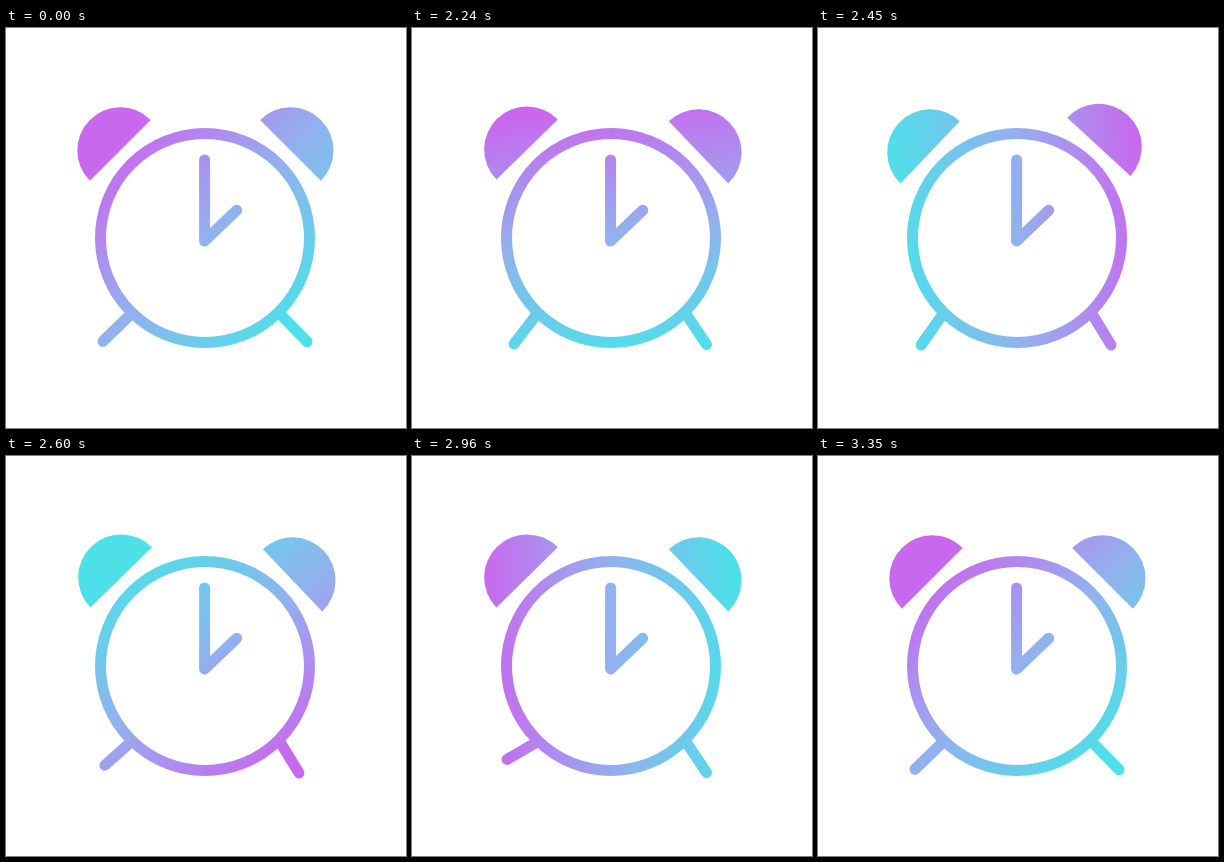
An HTML page with a canvas for the animation above (3440 ms loop, 400x400 px).

```html
<!DOCTYPE html>
<html lang="en">
<head>
<meta charset="utf-8">
<title>Alarm clock</title>
<style>
html, body { margin: 0; width: 100%; height: 100%; overflow: hidden; background: #fff; }
canvas { display: block; }
</style>
</head>
<body>
<canvas id="stage" width="400" height="400"></canvas>
<script>
const ctx = document.getElementById('stage').getContext('2d');
const LOOP = 3440, RING_START = 2030, STEP = 30, LAST_STEP = 44;
const CENTER = { x: 199, y: 210 };
const RAD = Math.PI / 180;

// step, gradient angle, left foot x/y, right foot x/y
const POSES = [
  [0, 46, 100.5, 312.5, 296, 313],
  [7, 82, 102, 316, 294.5, 316.5],
  [14, 176, 103.2, 317, 293, 317],
  [24, 292, 94.5, 301.5, 293, 317],
  [31, 357, 95, 303.5, 294.5, 316.5],
  [44, 405, 97, 313.3, 301, 313.7]
];
const REST = POSES[POSES.length - 1];

// The bells rattle in a cycle of three steps.
const LEFT_RATTLE = [-0.9, 0.55, -1.4];
const RIGHT_RATTLE = [1.6, 1.35, -2.35];

function poseAt(step) {
  const i = POSES.findIndex(p => p[0] >= step);
  if (i <= 0) return POSES[0];
  const a = POSES[i - 1], b = POSES[i];
  const k = (step - a[0]) / (b[0] - a[0]);
  return a.map((v, n) => v + (b[n] - v) * k);
}

function makePaint(angle) {
  const half = 127, cx = 201, cy = 205;
  const dx = Math.cos(angle * RAD) * half, dy = Math.sin(angle * RAD) * half;
  const paint = ctx.createLinearGradient(cx - dx, cy - dy, cx + dx, cy + dy);
  paint.addColorStop(0, '#c968ee');
  paint.addColorStop(0.5, '#93b0ee');
  paint.addColorStop(1, '#4de0e9');
  return paint;
}

function line(...points) {
  ctx.beginPath();
  points.forEach(([x, y]) => ctx.lineTo(x, y));
  ctx.stroke();
}

function rotatePoint(x, y, degrees) {
  const c = Math.cos(degrees * RAD), s = Math.sin(degrees * RAD);
  const dx = x - CENTER.x, dy = y - CENTER.y;
  return [CENTER.x + dx * c - dy * s, CENTER.y + dx * s + dy * c];
}

function bell(x, y, chord, turn, lift) {
  const [bx, by] = rotatePoint(x, y, turn);
  const start = (chord + turn) * RAD;
  ctx.beginPath();
  ctx.arc(bx, by - lift, 43, start, start + Math.PI);
  ctx.fill();
}

function hands(lift) {
  const tilt = lift * 0.4;
  const lifted = (x, y) => {
    const [px, py] = rotatePoint(x, y, tilt);
    return [px, py - lift];
  };
  line(lifted(198.6, 132), lifted(198.6, 213), lifted(230.7, 182.3));
}

function draw(time) {
  const t = time % LOOP;
  const step = Math.min(LAST_STEP, Math.floor((t - RING_START) / STEP));
  const ringing = step >= 0 && step < LAST_STEP;
  const [, angle, lx, ly, rx, ry] = ringing ? poseAt(step) : REST;
  const lift = ringing ? 2.5 * Math.max(0, Math.cos(step * Math.PI * 0.4)) ** 3 : 0;
  const rattle = list => ringing ? list[step % 3] * (step ? 1 : 0.75) : 0;

  ctx.fillStyle = '#fff';
  ctx.fillRect(0, 0, 400, 400);
  ctx.fillStyle = ctx.strokeStyle = makePaint(angle);
  ctx.lineWidth = 11;
  ctx.lineCap = ctx.lineJoin = 'round';

  bell(114.3, 122.3, 135, rattle(LEFT_RATTLE), lift);
  bell(284.5, 122.3, 225, rattle(RIGHT_RATTLE), lift);
  line([125, 286 - lift], [lx, ly]);
  line([274, 286 - lift], [rx, ry]);
  ctx.beginPath();
  ctx.arc(CENTER.x, CENTER.y - lift, 104.5, 0, Math.PI * 2);
  ctx.stroke();
  hands(lift);
}

const origin = performance.now();
function tick() {
  draw(performance.now() - origin);
  requestAnimationFrame(tick);
}
tick();
</script>
</body>
</html>
```
